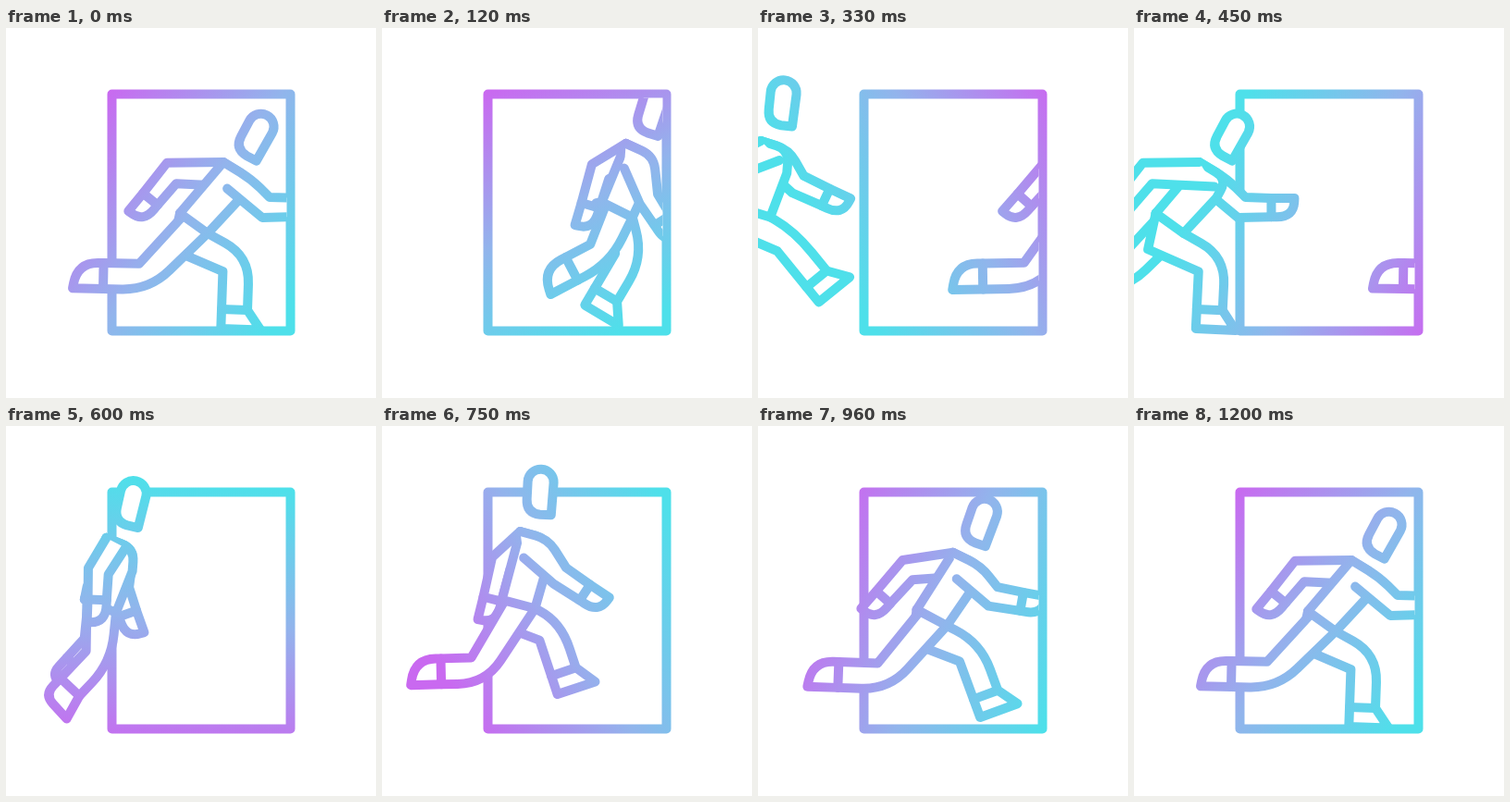
These frames come from a looping animation (400 by 400 pixels, 3230 ms). An HTML page with a canvas:

```html
<!DOCTYPE html>
<html lang="en">
<head>
<meta charset="utf-8">
<title>Running through a door</title>
<style>
  html, body { margin: 0; width: 100%; height: 100%; overflow: hidden; background: #fff; }
  canvas { display: block; width: 100vmin; height: 100vmin; }
</style>
</head>
<body>
<canvas id="stage" width="400" height="400"></canvas>
<script>
const ctx = document.getElementById('stage').getContext('2d');
const LOOP = 3230, STEP = 30, RUN = 1200, TRAVEL = 350;
const DOOR = { x: 114.5, y: 71.5, w: 193, h: 256 };
const RAD = Math.PI / 180;

// Key moments of a stride: reach, pass, rise, fly.
const MOMENTS = [0, 0.23, 0.6, 0.73];
// Lean in degrees, shoulder height, waist x from the shoulder.
const BODY = [[28, 145, -17], [17, 125, 7], [3, 114, 16], [6, 122, 10]];
// Elbow and wrist from the shoulder, forward first; two strides make a cycle.
const ARM = [
  [46, 49, 78, 49], [25, 60, 40, 83], [-21, 34, -31, 73], [-35, 30, -65, 64],
  [-56, 12, -79, 40], [-28, 30, -39, 67], [43, 48, 70, 66], [40, 47, 70, 61]
];
// Front of knee and ankle from the waist, planted first.
const LEG = [
  [45, 25, 43, 83], [12, 43, -16, 91], [-54, 81, -102, 82], [-62, 77, -120, 78],
  [-63, 61, -113, 60], [-25, 50, -60, 68], [28, 15, 45, 64], [26, 15, 61, 58]
];

const clamp = v => Math.max(0, Math.min(1, v));
const ease = (u, a, b) => 1 - Math.pow(1 - Math.pow(u, a), b);
const add = (p, d, k = 1) => [p[0] + d[0] * k, p[1] + d[1] * k];
const mix = (p, q, k) => [p[0] + (q[0] - p[0]) * k, p[1] + (q[1] - p[1]) * k];
const round = (p, cut) => [p[0], p[1], cut];

// Monotone cubic through a cyclic track of poses.
function pose(track, phase) {
  const count = MOMENTS.length;
  const time = n => Math.floor(n / count) + MOMENTS[(n + count) % count];
  const row = n => track[(n + track.length) % track.length];
  let i = Math.floor(phase) * count;
  while (time(i + 1) <= phase) i++;
  const span = time(i + 1) - time(i), u = (phase - time(i)) / span;
  return row(i).map((v, c) => {
    const slope = n => (row(n + 1)[c] - row(n)[c]) / (time(n + 1) - time(n));
    const tangent = n => {
      const p = slope(n - 1), q = slope(n);
      return p * q > 0 ? 2 * p * q / (p + q) : 0;
    };
    return v + (row(i + 1)[c] - v) * u * u * (3 - 2 * u)
      + span * u * (1 - u) * ((1 - u) * tangent(i) - u * tangent(i + 1));
  });
}

// Direction of a bone and the normal on its front side.
function bone(a, b) {
  const x = b[0] - a[0], y = b[1] - a[1], len = Math.hypot(x, y) || 1;
  return { dir: [x / len, y / len], front: [y / len, -x / len] };
}

// Mitred front normal where two bones meet.
function bend(a, b) {
  const dot = a.front[0] * b.front[0] + a.front[1] * b.front[1];
  const k = 1 / Math.max(0.6, 1 + dot);
  return [(a.front[0] + b.front[0]) * k, (a.front[1] + b.front[1]) * k];
}

function toward(p, q, cut) {
  const len = Math.hypot(q[0] - p[0], q[1] - p[1]) || 1;
  return mix(p, q, Math.min(cut / len, 0.8));
}

// A polyline whose points may carry a corner rounding.
function trace(pts) {
  ctx.beginPath();
  pts.forEach((p, i) => {
    if (i && p[2] && i < pts.length - 1) {
      ctx.lineTo(...toward(p, pts[i - 1], p[2]));
      ctx.quadraticCurveTo(p[0], p[1], ...toward(p, pts[i + 1], p[2]));
    } else ctx.lineTo(p[0], p[1]);
  });
}

function paint() {
  ctx.fill();
  ctx.stroke();
}

function line(p, q) {
  trace([p, q]);
  ctx.stroke();
}

function drawArm(body, phase) {
  const { shoulder, chest } = body;
  const [ex, ey, wx, wy] = pose(ARM, phase % 2);
  const socket = add(shoulder, [5, 15]);
  const elbow = add(shoulder, [ex, ey]), wrist = add(shoulder, [wx, wy]);
  const upper = bone(socket, elbow), fore = bone(elbow, wrist), joint = bend(upper, fore);
  const forward = upper.dir[0] > 0, half = forward ? 11 : -11;

  // The top edge starts at the shoulder, the lower edge inside the torso.
  const wristTop = add(wrist, fore.front, half * 0.92);
  const wristLow = add(wrist, fore.front, -half * 0.92);
  const root = add(add(socket, upper.front, -half), upper.dir, forward ? 8 : -12);
  const start = forward ? [shoulder, round(chest, 14)] : [shoulder];
  trace([...start, add(elbow, joint, half), wristTop, add(wristTop, fore.dir, 25),
    round(add(wristLow, fore.dir, 24), 18), wristLow, add(elbow, joint, -half), root]);
  paint();
  line(wristTop, wristLow);
}

function drawLeg(body, phase) {
  const { waist, rear } = body, width = 28;
  const [kx, ky, ax, ay] = pose(LEG, phase % 2);
  const knee = add(waist, [kx, ky]), ankle = add(waist, [ax, ay]);
  const thigh = bone(waist, knee), shin = bone(knee, ankle);
  const seat = add(add(waist, thigh.front, -34), thigh.dir, -25);
  const ankleRear = add(ankle, shin.front, -width);

  // The foot points back as the shin lifts behind the runner.
  const lift = clamp((-shin.dir[0] - 0.5) / 0.35);
  const heel = add(ankleRear, shin.dir, 21 + 7 * lift);
  const toe = add(add(ankle, shin.dir, 21 + 12 * lift), shin.front, 15 * (1 - lift));
  trace([rear, seat, add(knee, bend(thigh, shin), -width), ankleRear,
    round(heel, 24 * lift), toe, ankle, round(knee, 30), waist]);
  paint();
  line(ankleRear, ankle);
}

function drawHead(x, y, lean) {
  ctx.save();
  ctx.translate(x, y);
  ctx.rotate(lean * RAD);
  ctx.beginPath();
  ctx.moveTo(13, 24);
  ctx.lineTo(1, 24);
  ctx.quadraticCurveTo(-14, 23, -14, 8);
  ctx.lineTo(-14, -11);
  ctx.arc(0, -11, 14, Math.PI, 0);
  ctx.closePath();
  ctx.restore();
  paint();
}

function drawRunner(track, top, phase) {
  const [lean, height, waistX] = pose(BODY, phase % 1);
  // The shoulder swings back as the body rises.
  const x = track - 0.75 * (145 - height);
  const shoulder = [x, height];
  const waist = [x + waistX, height + 84 - lean / 4];
  const hips = (12 + 0.85 * lean) * RAD;
  const rear = add(waist, [Math.cos(hips), Math.sin(hips)], -37);
  const chest = [x + 30, height + 7 + 0.4 * lean];
  const pit = add(mix(chest, waist, 0.35), [5, 0]);
  const body = { shoulder, chest, waist, rear };

  ctx.save();
  ctx.beginPath();
  ctx.rect(0, top, DOOR.x + DOOR.w - 4, 400 - top);
  ctx.clip();
  drawArm(body, phase + 1);
  drawLeg(body, phase);
  drawLeg(body, phase + 1);
  trace([shoulder, round(chest, 14), pit, waist, rear, shoulder]);
  paint();
  drawArm(body, phase);
  drawHead(x + 20 + 0.55 * lean, height - 44 + 0.55 * lean, lean);
  ctx.restore();
}

function gradient(angle) {
  const cx = DOOR.x + DOOR.w / 2, cy = DOOR.y + DOOR.h / 2;
  const dx = 160 * Math.cos(angle), dy = 160 * Math.sin(angle);
  const g = ctx.createLinearGradient(cx + dx, cy + dy, cx - dx, cy - dy);
  g.addColorStop(0, '#c969f0');
  g.addColorStop(0.47, '#92b4ec');
  g.addColorStop(0.93, '#4ee0ea');
  return g;
}

function draw(ms) {
  const t = Math.min(Math.floor((ms % LOOP) / STEP) * STEP, RUN), u = t / RUN;
  const phase = 2 * ease(u, 1.2, 1.9);
  const track = -115 + TRAVEL * ease(u, 1.2, 2.05);
  ctx.fillStyle = '#fff';
  ctx.fillRect(0, 0, 400, 400);
  ctx.lineWidth = 10;
  ctx.lineCap = ctx.lineJoin = 'round';
  ctx.strokeStyle = gradient((360 * ease(u, 1.55, 2.6) - 143) * RAD);
  ctx.strokeRect(DOOR.x, DOOR.y, DOOR.w, DOOR.h);
  // One runner leaves through the door while the next one arrives.
  drawRunner(track + TRAVEL, DOOR.y + 4, phase);
  drawRunner(track, 0, phase);
}

const start = performance.now();
function tick() {
  draw(performance.now() - start);
  requestAnimationFrame(tick);
}
tick();
</script>
</body>
</html>
```
